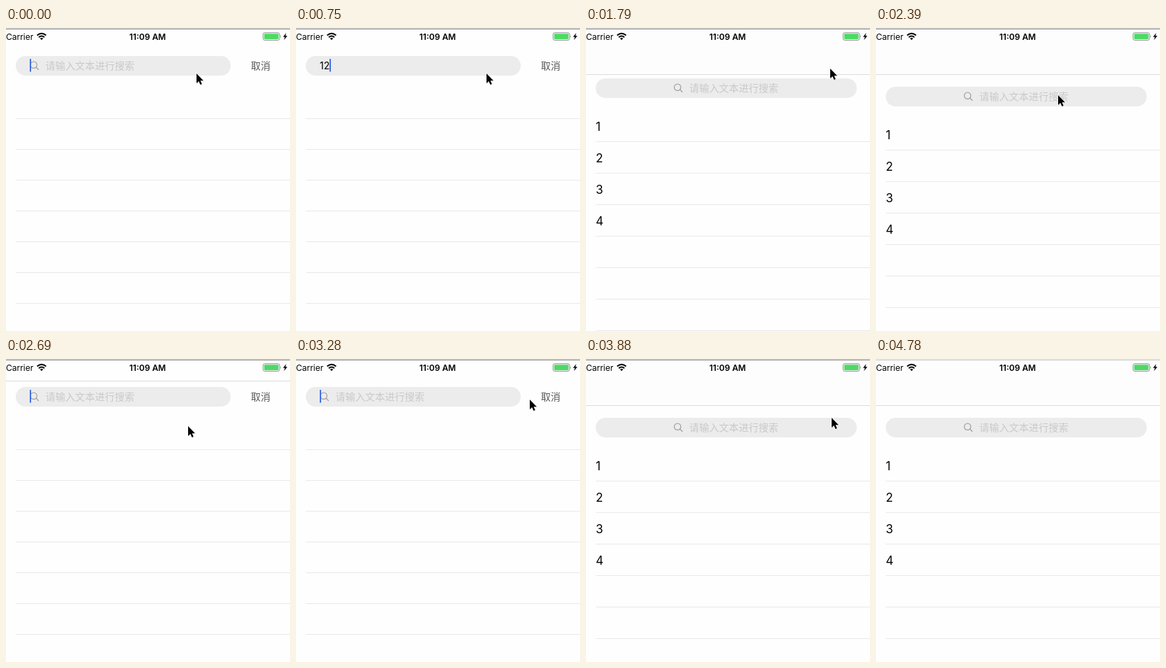
Write an HTML page that moves like this. It is 407 px wide and 433 px high and loops after 4880 ms.

```html
<!DOCTYPE html>
<html lang="zh-CN">
<head>
<meta charset="utf-8">
<title>Search bar</title>
<style>
html, body { margin: 0; width: 100%; height: 100%; overflow: hidden; background: #fefefe; }
svg { display: block; width: 407px; height: 433px; }
text { font-family: Inter, "Noto Sans CJK SC", "Noto Sans CJK", sans-serif; fill: #000; }
.status { font-size: 12px; }
.hint { font-size: 14.2px; fill: #c9c9cb; }
.field { fill: #ececec; }
.row { font-size: 17px; }
.lens { fill: none; stroke: #98989b; stroke-width: 1.1; stroke-linecap: round; }
</style>
</head>
<body>
<svg viewBox="0 0 407 433">
  <defs>
    <g id="prompt">
      <g class="lens"><circle cx="5.2" cy="-1.3" r="4.7"/><path d="M8.7 2.2 L12 5.5"/></g>
      <text class="hint" x="22" y="5.2">请输入文本进行搜索</text>
    </g>
  </defs>
  <rect width="407" height="433" fill="#fefefe"/>

  <g id="home">
    <g id="list">
      <rect class="field" x="14" y="84" width="374" height="28" rx="14"/>
      <use href="#prompt" x="126" y="98"/>
    </g>
    <rect width="407" height="66" fill="#fdfdfd"/>
  </g>

  <g id="search">
    <rect class="field" x="14" y="40" width="308" height="28" rx="14"/>
    <use id="hint" href="#prompt" x="34.5" y="54"/>
    <text id="query" x="34" y="59" font-size="14"></text>
    <rect id="caret" y="44" width="2" height="18.5" rx=".5" fill="#4671e2"/>
    <text x="351" y="59" font-size="14" style="fill:#58585a">取消</text>
    <text id="hit" class="row" x="14" y="114">1</text>
  </g>

  <rect id="edge" width="407" height="1" fill="#dcdcde"/>

  <text class="status" x="0" y="17">Carrier</text>
  <g fill="none" stroke="#000" stroke-width="2">
    <path d="M44.6 10.6 Q51 5 57.4 10.6"/>
    <path d="M47 13.3 Q51 9.8 55 13.3"/>
  </g>
  <path d="M48.8 14.8 Q51 13 53.2 14.8 L51 17.2 Z"/>
  <text class="status" x="203" y="17" text-anchor="middle" font-weight="600">11:09 AM</text>
  <rect x="368.5" y="6.8" width="23.5" height="10.6" rx="2.2" fill="#fff" stroke="#8b8b8d"/>
  <rect x="370" y="8.3" width="20.5" height="7.6" rx="1" fill="#4cd964"/>
  <path d="M393.2 10 Q395 12 393.2 14.2 Z" fill="#8b8b8d"/>
  <path d="M401.6 7 L397 12.8 H399.7 L398.3 17.3 L403.2 11.2 H400.4 Z"/>

  <g id="top">
    <rect width="407" height="1" fill="#dadada"/>
    <rect y="1" width="407" height="1" fill="#8c8c8c"/>
  </g>
  <g id="mouse">
    <path d="M.8 1 V15 L4 12 L6.3 17 L8.6 16 L6.4 11.2 H10.8 Z" fill="#000" opacity=".16"/>
    <path d="M0 0 V14 L3.2 11.1 L5.5 16.1 L7.8 15.1 L5.6 10.3 H10 Z" stroke="#fff" stroke-width="1.2" paint-order="stroke"/>
  </g>
</svg>
<script>
const LOOP = 4880;
const el = id => document.getElementById(id);
const show = (id, on) => { el(id).style.display = on ? '' : 'none'; };

function add(tag, attrs, content = '') {
  const node = document.createElementNS('http://www.w3.org/2000/svg', tag);
  for (const k in attrs) node.setAttribute(k, attrs[k]);
  node.textContent = content;
  return node;
}

function separators(parent, first, gap, count) {
  for (let i = 0; i < count; i++)
    parent.append(add('rect', { x: 14, y: first + i * gap, width: 393, height: 1, fill: '#e9e9eb' }));
}

separators(el('search'), 129, 44, 7);
separators(el('list'), 174, 45, 8);
for (let n = 1; n <= 4; n++)
  el('list').append(add('text', { class: 'row', x: 14, y: 114 + 45 * n }, n));

// Each step: start time and the properties that change there.
const steps = [
  [0, { home: false, shift: 0, query: '', hit: false, edge: null, mouse: [273, 65], top: 1 }],
  [150, { query: '1' }],
  [300, { hit: true }],
  [750, { query: '12', hit: false }],
  [1050, { mouse: [290, 64] }],
  [1200, { mouse: [330, 60] }],
  [1350, { mouse: [357, 54] }],
  [1500, { mouse: [362, 52] }],
  [1650, { home: true, shift: -42, query: '' }],
  [1790, { shift: -12, edge: 66, mouse: [350, 58] }],
  [1940, { shift: 0, mouse: [312, 75] }],
  [2090, { mouse: [270, 90] }],
  [2240, { mouse: [264, 94] }],
  [2390, { mouse: [261, 96] }],
  [2690, { home: false, edge: 31 }],
  [2840, { edge: null }],
  [3130, { mouse: [285, 80] }],
  [3280, { mouse: [335, 58] }],
  [3430, { mouse: [366, 47] }],
  [3580, { home: true, shift: -41, mouse: [367, 45] }],
  [3730, { shift: -11, edge: 66, mouse: [366, 48] }],
  [3880, { shift: 0, mouse: [352, 84] }],
  [4030, { mouse: [309, 190] }],
  [4180, { mouse: [232, 413] }],
  [4330, { mouse: null }],
  [4780, { top: .45 }]
];

function draw(t) {
  const s = {};
  for (const [at, change] of steps) if (t >= at) Object.assign(s, change);
  show('home', s.home);
  show('search', !s.home);
  show('hint', !s.query);
  show('hit', s.hit);
  show('edge', s.edge !== null);
  show('mouse', s.mouse);
  el('list').setAttribute('transform', `translate(0 ${s.shift})`);
  el('query').textContent = s.query;
  el('caret').setAttribute('x', [34, 41, 48][s.query.length]);
  el('edge').setAttribute('y', s.edge ?? 0);
  el('top').setAttribute('opacity', s.top);
  if (s.mouse) el('mouse').setAttribute('transform', `translate(${s.mouse})`);
}

const start = performance.now();
let last = -1;
function tick() {
  const t = (performance.now() - start) % LOOP;
  const i = steps.filter(([at]) => t >= at).length;
  if (i !== last) draw(t);
  last = i;
  requestAnimationFrame(tick);
}
tick();
</script>
</body>
</html>
```
